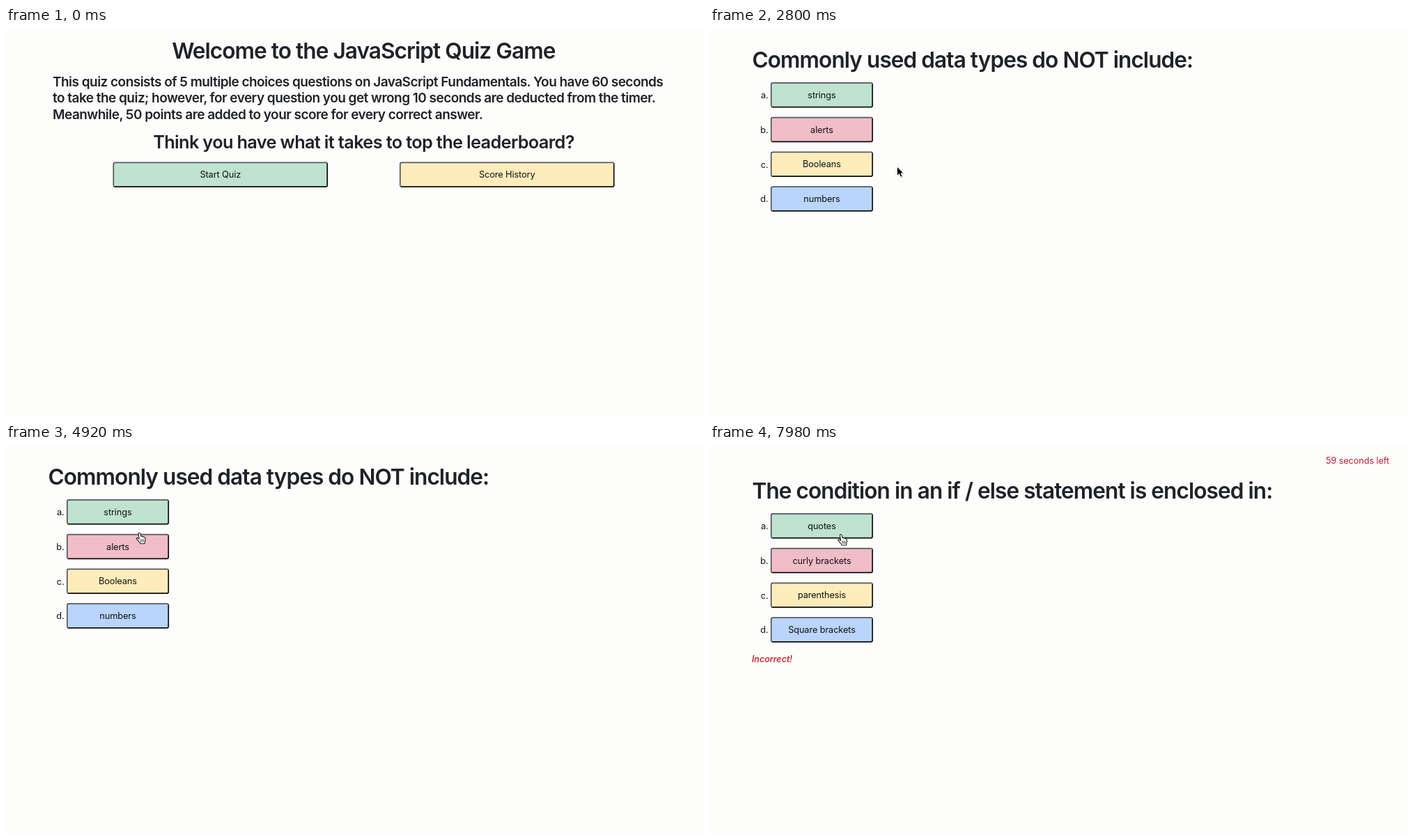
These frames come from a looping animation (1002x559 px, 8000 ms). An HTML page:

```html
<!DOCTYPE html>
<html lang="en">
<head>
<meta charset="utf-8">
<title>JavaScript Quiz Game</title>
<style>
  html, body { margin: 0; width: 100%; height: 100%; overflow: hidden; background: #fdfdfc; }
  svg { display: block; width: 1002px; height: 559px; }
  text { font-family: Inter, "Open Sans", sans-serif; font-optical-sizing: none; fill: #1f2226; }
  .h1, .h2, .intro { font-weight: 600; }
  .h1 { font-size: 31.6px; letter-spacing: -.03em; }
  .h2 { font-size: 25.3px; letter-spacing: -.0255em; }
  .intro { font-size: 19px; letter-spacing: -.028em; }
  .small { font-size: 12.8px; letter-spacing: -.01em; }
  .label { fill: #111; }
  .timer { fill: #b9203f; }
  .wrong { fill: #c5161f; font-style: italic; font-weight: 500; }
  .middle { text-anchor: middle; }
  .end { text-anchor: end; }
  .edge { fill: none; stroke-width: 1.7; }
  .light { stroke: #55585c; }
  .dark { stroke: #0c0c0c; }
  .pressed .light { stroke: #0c0c0c; }
  .pressed .dark { stroke: #55585c; }
</style>
</head>
<body>
<svg viewBox="0 0 1002 559">
  <g id="stage"></g>
  <g id="arrow">
    <path d="M0 0V13.4L3.1 10.6L5.2 15.4L7.7 14.3L5.6 9.7H9.6Z" transform="translate(.5 1.2)" fill="#000" opacity=".2"/>
    <path d="M0 0V13.4L3.1 10.6L5.2 15.4L7.7 14.3L5.6 9.7H9.6Z" fill="#000" stroke="#fff" stroke-width="1"/>
  </g>
  <g id="hand">
    <g transform="translate(-1.5 -4)" stroke="#1c1c1c" stroke-linejoin="round" stroke-linecap="round">
      <path d="M-2 1.5Q-2.2 0 -.8 0Q.4 0 .8 1.4L1.7 5Q3.4 4.2 4 5.6Q5.5 5 6 6.3Q7.6 6 8 8Q8.4 11 7.3 13L7 15.5H.8L0 14Q-2 11.6 -4.6 8.6Q-4.7 7 -2.9 7.3L-.8 8.8Z" fill="#fff" stroke-width="1.1"/>
      <path d="M1.6 9.5V13M3.6 9.5V13M5.6 9.5V13" fill="none" stroke-width=".8"/>
    </g>
  </g>
</svg>
<script>
const LOOP = 8000;
const QUESTION_AT = 2640, TIMER_AT = 5160, PRESS_AT = 7540, ANSWER_AT = 7720;
const GREEN = '#c0e2d0', PINK = '#f1bdc8', YELLOW = '#feedbb', BLUE = '#b9d5fb';

const text = (str, x, y, cls) => `<text x="${x}" y="${y}" class="${cls}">${str}</text>`;

function button(label, x, y, w, h, fill) {
  const l = x + .8, t = y + .8, r = x + w - .8, b = y + h - .8, k = 2.4;
  return `<g class="button">
    <rect x="${l}" y="${t}" width="${r - l}" height="${b - t}" rx="${k}" fill="${fill}"/>
    <path class="edge light" d="M${l + .7} ${b - .7}Q${l} ${b - 1} ${l} ${b - k}V${t + k}Q${l} ${t} ${l + k} ${t}H${r - k}Q${r - 1} ${t} ${r - .7} ${t + .7}"/>
    <path class="edge dark" d="M${r - .7} ${t + .7}Q${r} ${t + 1} ${r} ${t + k}V${b - k}Q${r} ${b} ${r - k} ${b}H${l + k}Q${l + 1} ${b} ${l + .7} ${b - .7}"/>
    ${text(label, x + w / 2, y + h / 2 + 4.7, 'small label middle')}</g>`;
}

function welcome() {
  const lines = [
    'This quiz consists of 5 multiple choices questions on JavaScript Fundamentals. You have 60 seconds',
    'to take the quiz; however, for every question you get wrong 10 seconds are deducted from the timer.',
    'Meanwhile, 50 points are added to your score for every correct answer.'
  ];
  return text('Welcome to the JavaScript Quiz Game', 513.3, 44, 'h1 middle')
    + lines.map((line, i) => text(line, 67, 83.6 + i * 23.45, 'intro')).join('')
    + text('Think you have what it takes to top the leaderboard?', 513.5, 173, 'h2 middle')
    + button('Start Quiz', 153.5, 192.5, 308.5, 36.5, GREEN)
    + button('Score History', 565, 192.5, 308.5, 36.5, YELLOW);
}

function question(title, answers) {
  const fills = [GREEN, PINK, YELLOW, BLUE];
  return text(title, 60.5, 57, 'h1') + answers.map((answer, i) => {
    const y = 78 + i * 49.75;
    return text('abcd'[i] + '.', 83.5, y + 23, 'small label end')
      + button(answer, 87, y, 147, 36.5, fills[i]);
  }).join('');
}

const stage = document.getElementById('stage');
function group(content) {
  const g = document.createElementNS('http://www.w3.org/2000/svg', 'g');
  g.innerHTML = content;
  stage.append(g);
  return g;
}

const start = group(welcome());
const first = group(question('Commonly used data types do NOT include:',
  ['strings', 'alerts', 'Booleans', 'numbers']));
const second = group(question('The condition in an if / else statement is enclosed in:',
  ['quotes', 'curly brackets', 'parenthesis', 'Square brackets']));
second.setAttribute('transform', 'translate(0 20)');
const timer = group(text('59 seconds left', 929.5, 26.5, 'small timer middle'));
const verdict = group(text('Incorrect!', 60, 311.5, 'small wrong'));
const firstAnswer = first.querySelector('.button');
const arrow = document.getElementById('arrow');
const hand = document.getElementById('hand');

// Pointer stops: time, x, y
const stops = [
  [20, 900, -2], [800, 268.5, 199], [3480, 268.5, 199], [4180, 227.5, 190],
  [4320, 227.5, 190], [5060, 190, 124], [5820, 190, 124], [5900, 190, 135],
  [7160, 190, 135], [7260, 190, 132.5], [LOOP, 190, 132.5]
];
const handTimes = [[760, QUESTION_AT], [3980, 4500], [4620, 4950], [7260, LOOP]];

function pointerAt(t) {
  const i = Math.max(1, stops.findIndex(s => s[0] > t));
  const [t0, x0, y0] = stops[i - 1], [t1, x1, y1] = stops[i];
  const p = Math.max(0, (t - t0) / (t1 - t0));
  const e = p * p * (3 - 2 * p);
  return [x0 + (x1 - x0) * e, y0 + (y1 - y0) * e];
}

const show = (el, on) => el.setAttribute('display', on ? 'inline' : 'none');

function draw(t) {
  show(start, t < QUESTION_AT);
  show(first, t >= QUESTION_AT && t < ANSWER_AT);
  show(second, t >= ANSWER_AT);
  show(timer, t >= TIMER_AT);
  show(verdict, t >= ANSWER_AT);
  first.setAttribute('transform', `translate(0 ${t >= TIMER_AT ? 20 : 0})`);
  firstAnswer.classList.toggle('pressed', t >= PRESS_AT);

  const pointing = handTimes.some(([from, to]) => t >= from && t < to);
  const [x, y] = pointerAt(t);
  show(arrow, t >= 20 && !pointing);
  show(hand, pointing);
  (pointing ? hand : arrow).setAttribute('transform', `translate(${x} ${y})`);
}

let begin;
function tick(now) {
  begin ??= now;
  draw((now - begin) % LOOP);
  requestAnimationFrame(tick);
}
draw(0);
requestAnimationFrame(tick);
</script>
</body>
</html>
```
